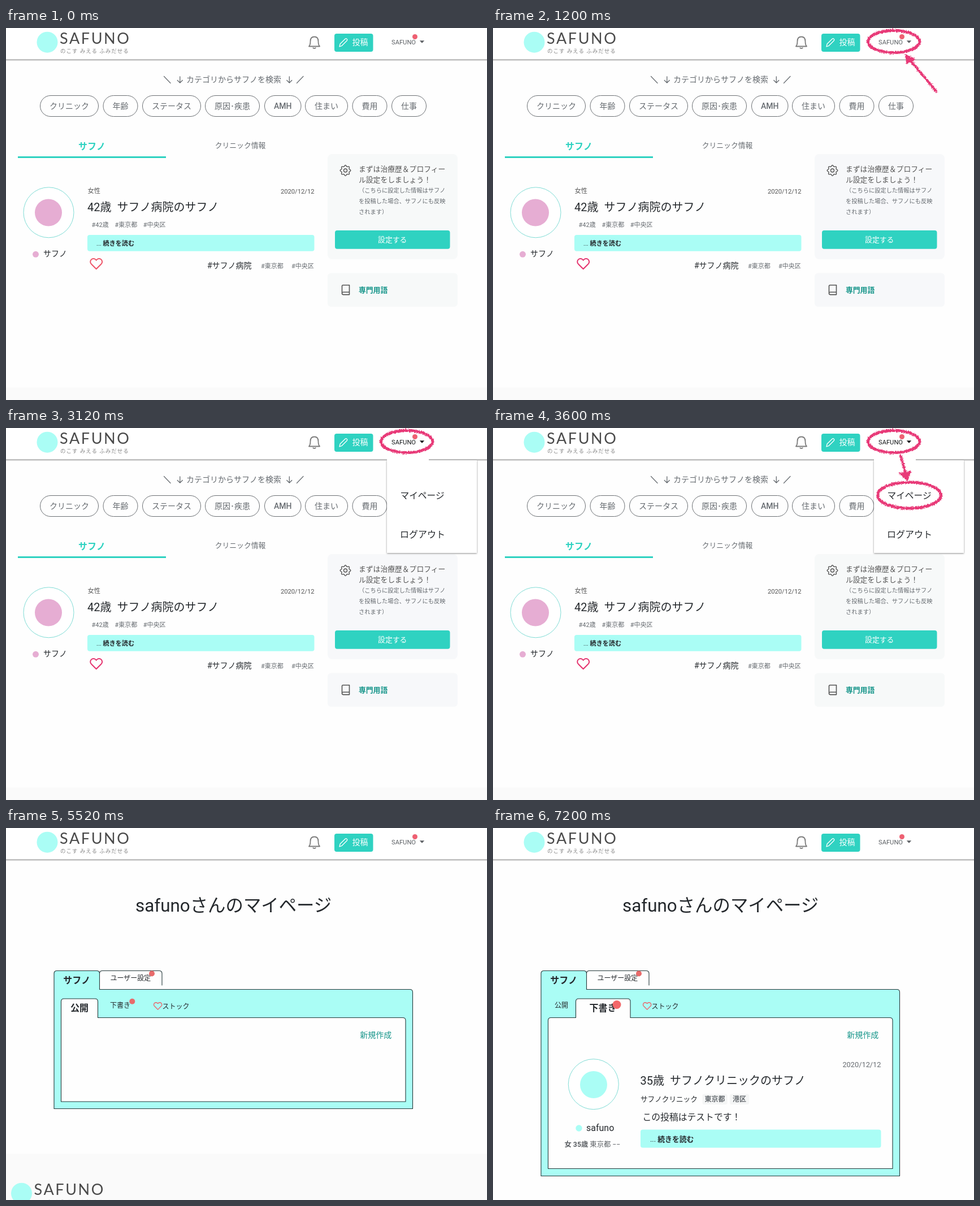
An HTML page that plays this animation: 851 px wide and 658 px high, repeating every 8000 ms.

```html
<!DOCTYPE html>
<html lang="ja">
<head>
<meta charset="utf-8">
<title>マイページの使い方</title>
<style>
html, body { margin: 0; width: 100%; height: 100%; overflow: hidden; background: #fefefe; }
svg { display: block; width: 851px; height: 658px; }
text { font-family: Roboto, "Noto Sans CJK JP", "Noto Sans CJK", sans-serif; white-space: pre; }
.logo { font-family: Lato, sans-serif; letter-spacing: 2.6px; }
.tagline { letter-spacing: 1px; }
.mark { fill: none; stroke: #e83a78; stroke-width: 5; stroke-linecap: round; filter: url(#crayon); }
.mark path { stroke-width: 4.4; }
.mark polygon { fill: #e83a78; stroke-width: 1.5; }
</style>
</head>
<body>
<svg id="stage" viewBox="0 0 851 658" xmlns="http://www.w3.org/2000/svg"></svg>
<script>
const TEAL = '#2fd2c1', AQUA = '#aafdf5', DEEP = '#16958a', INK = '#24282c',
      GREY = '#666b70', LINE = '#24383a', CORAL = '#ec646a', PINK = '#e6add3';
const STEP = 1200, LOOP = 8000;

// Drawing helpers, each returning SVG markup
const text = (x, y, size, str, { fill = INK, w = 400, a = 'start', cls = '' } = {}) =>
  `<text x="${x}" y="${y}" font-size="${size}" fill="${fill}" font-weight="${w}" text-anchor="${a}" class="${cls}">${str}</text>`;
const box = (x, y, w, h, fill, r = 0, stroke = 'none') =>
  `<rect x="${x}" y="${y}" width="${w}" height="${h}" rx="${r}" fill="${fill}" stroke="${stroke}"/>`;
const dot = (x, y, r, fill, stroke = 'none') =>
  `<circle cx="${x}" cy="${y}" r="${r}" fill="${fill}" stroke="${stroke}"/>`;
const path = (d, stroke, w = 1, fill = 'none') =>
  `<path d="${d}" stroke="${stroke}" stroke-width="${w}" fill="${fill}" stroke-linecap="round" stroke-linejoin="round"/>`;
const heart = (x, y, s, color) =>
  `<g transform="translate(${x} ${y}) scale(${s})">` +
  path('M20.84 4.61a5.5 5.5 0 0 0-7.78 0L12 5.67l-1.06-1.06a5.5 5.5 0 0 0-7.78 7.78l1.06 1.06L12 21.23l7.78-7.78 1.06-1.06a5.5 5.5 0 0 0 0-7.78z', color, 2) + '</g>';
const oval = (x, y, rx, ry) => `<ellipse cx="${x}" cy="${y}" rx="${rx}" ry="${ry}"/>`;
const arrow = (line, head) => `<path d="${line}"/><polygon points="${head}"/>`;
const mark = body => `<g class="mark">${body}</g>`;
const readMore = (x, y, size) =>
  text(x, y, size, '... <tspan font-weight="700">続きを読む</tspan>');
// Group shown only during the listed steps
const during = (steps, ...parts) => `<g data-steps="${steps}">${parts.join('')}</g>`;

// Eight rounded teeth: the radius swings with the angle
function gear(x, y) {
  const pts = Array.from({ length: 96 }, (_, i) => {
    const a = i * Math.PI / 48, r = 8.2 + 1.1 * Math.cos(8 * a);
    return `${(x + r * Math.cos(a)).toFixed(1)} ${(y + r * Math.sin(a)).toFixed(1)}`;
  });
  return path(`M${pts.join('L')}z`, '#555', 1.4) +
    `<circle cx="${x}" cy="${y}" r="3" fill="none" stroke="#555" stroke-width="1.4"/>`;
}

const logo = () =>
  dot(73, 25.2, 18.5, AQUA) +
  text(95, 28, 27, 'SAFUNO', { fill: '#4a4a4a', cls: 'logo' }) +
  text(96, 44, 9.5, 'のこす みえる ふみだせる', { fill: '#888', cls: 'tagline' });

const account = fill =>
  text(682, 28.5, 11.2, 'SAFUNO', { fill }) +
  `<path d="M731.8 22.3h8.4l-4.2 4.4z" fill="${fill}"/>` + dot(723.5, 15.5, 4.5, '#ee6072');

const header = () => [
  box(0, 0, 851, 55.5, '#fff'),
  box(0, 55.3, 851, 1.7, '#b2b2b2'), box(0, 57, 851, 1.2, '#e4e4e4'),
  logo(),
  path('M545.5 15.5c-5 0-7 3.8-7 8 0 5.5-1 7.5-2.5 9h19c-1.5-1.5-2.5-3.5-2.5-9 0-4.2-2-8-7-8zM543.3 35.3q2.2 1.6 4.4 0', '#7c7c7c', 1.8),
  box(581, 10, 68.5, 32, TEAL, 4),
  path('M590 33l1.2-5 9-8.8q1.5-1.2 2.9.2t.2 2.9l-9 9z', '#fff', 1.3),
  text(612.5, 30, 14, '投稿', { fill: '#fff', w: 500 })
].join('');

const pills = [
  [60.5, 103, 'クリニック'], [172, 61, '年齢'], [241.5, 103, 'ステータス'], [352.5, 96, '原因･疾患'],
  [457.5, 64.5, 'AMH'], [529.5, 75, '住まい'], [613, 61, '費用'], [682.5, 61, '仕事']
].map(([x, w, s]) =>
  box(x, 119.5, w, 37, 'none', 18.5, '#6c7074') +
  text(x + w / 2, 143, 14, s, { fill: GREY, w: 500, a: 'middle' })).join('');

const down = x => path(`M${x} 86v11M${x - 4.5} 92.5l4.5 4.5 4.5-4.5`, GREY, 1.3);

const tags = (y, list) => list.map(([x, s]) => text(x, y, 11, s, { fill: GREY })).join('');

const article = () => [
  text(152, 215, 16, 'サフノ', { fill: TEAL, w: 700, a: 'middle' }),
  box(21, 227, 262, 3, TEAL),
  text(414.5, 212.3, 12.8, 'クリニック情報', { fill: GREY, a: 'middle' }),
  dot(75.5, 326.3, 44.5, '#fff', '#7fdcd5'), dot(75, 326.5, 24, PINK),
  dot(52.5, 400.3, 5.5, PINK), text(66, 404.3, 14, 'サフノ'),
  text(144.5, 292.3, 11.2, '女性', { fill: '#555' }),
  text(545.5, 292.7, 11.2, '2020/12/12', { fill: '#555', a: 'end' }),
  text(144, 324, 20, '42歳\u00a0\u00a0サフノ病院のサフノ'),
  tags(352, [[151.5, '#42歳'], [192.5, '#東京都'], [242.8, '#中央区']]),
  box(144, 366, 401.5, 28.7, AQUA, 4),
  readMore(160, 384.5, 11.1),
  text(356, 425.3, 14, '#サフノ病院'),
  tags(425, [[451, '#東京都'], [505, '#中央区']])
].join('');

const cards = fill => box(569, 223, 230, 186, fill, 8) + box(569, 433.5, 230, 59.5, fill, 6);

const sidebar = () => {
  const note = ['（こちらに設定した情報はサフノ', 'を投稿した場合、サフノにも反映', 'されます）'];
  return [
    gear(600.5, 252),
    text(624, 254, 12.8, 'まずは治療歴＆プロフィー', { fill: '#555' }),
    text(624, 273, 12.8, 'ル設定をしましょう！', { fill: '#555' }),
    ...note.map((s, i) => text(624, 291.3 + 19 * i, 10.24, s, { fill: GREY })),
    box(582, 358, 203.5, 32.8, TEAL, 4),
    text(683.7, 379.2, 12.8, '設定する', { fill: '#fff', w: 500, a: 'middle' }),
    path('M596.5 454.8h11v16.8h-11q-2-.2-2-2v-12.8q0-2 2-2zM594.5 469q.2-1.8 2-1.8h11', '#555', 1.6),
    text(624, 468, 12.8, '専門用語', { fill: DEEP, w: 700 })
  ].join('');
};

const home = () => [
  path('M279.5 85.5l11.5 12M526 85.5l-11.5 12', GREY, 1.2), down(307.8), down(501.3),
  text(319, 96.3, 14, 'カテゴリからサフノを検索', { fill: GREY }),
  pills, article(), sidebar(), box(0, 636, 851, 22, '#fafafa')
].join('');

const menu = () => [
  `<rect x="674" y="57" width="159" height="164" fill="#fff" filter="url(#drop)"/>`,
  box(674, 54.5, 74, 5, '#fff'),
  text(697.5, 125.3, 15.7, 'マイページ'), text(697, 193.8, 16, 'ログアウト')
].join('');

// Panel whose top edge opens into a tab between x1 and x2
const panel = (l, r, top, bottom, x1, x2, tabTop, fill) => path(
  `M${l} ${bottom}` +
  (x1 > l ? `V${top + 5}q0-5 5-5H${x1}` : '') +
  `V${tabTop + 5}q0-5 5-5H${x2 - 5}q5 0 5 5V${top}H${r - 5}q5 0 5 5V${bottom}z`, LINE, 1.1, fill);

const outer = bottom => [
  panel(85, 719.5, 285.5, bottom, 85, 165.5, 252.5, AQUA),
  path('M165.5 257.5q0-5 5-5H271q5 0 5 5V278', LINE, 1.1),
  text(125.3, 274.5, 16, 'サフノ', { w: 700, a: 'middle' }),
  text(184.5, 269.7, 12, 'ユーザー設定'), dot(258, 257.5, 5, '#e86b6b')
].join('');

const heading = text(229, 148, 31.4, 'safunoさんのマイページ');
const create = text(626.3, 371, 14, '新規作成', { fill: DEEP });
const stock = x => heart(x, 306.7, 0.68, CORAL) + text(x + 16, 319.8, 12, 'ストック');

const published = () => [
  box(0, 576, 851, 82, '#fafafa'),
  `<g transform="translate(-45.5 621)">${logo()}</g>`,
  outer(496.5),
  panel(97.5, 707, 335.5, 484, 97.5, 162.5, 302, '#fefefe'),
  text(130, 324.3, 16, '公開', { w: 700, a: 'middle' }),
  text(184, 318.3, 12, '下書き'), dot(223.3, 306.7, 5, '#e86b6b'),
  stock(260.5), create
].join('');

const drafts = () => [
  outer(615.5),
  panel(97.5, 707, 335.5, 602.5, 146.5, 243, 302, '#fefefe'),
  text(109, 318.3, 12, '公開'),
  text(194.5, 324.3, 16, '下書き', { w: 700, a: 'middle' }), dot(219, 312.5, 7.5, '#f2686a'),
  stock(264.5), create,
  text(686.5, 422.7, 12.8, '2020/12/12', { fill: GREY, a: 'end' }),
  dot(177.8, 453.2, 44.5, '#fff', '#7fdcd5'), dot(178, 454, 24, AQUA),
  dot(152, 531, 5.7, AQUA), text(165, 536, 16, 'safuno'),
  text(126.5, 563.5, 12.3, '<tspan font-weight="700">女 35歳</tspan> 東京都 −−', { fill: '#5c6064' }),
  text(260.5, 454, 20, '35歳\u00a0\u00a0サフノクリニックのサフノ'),
  text(261, 484, 12.6, 'サフノクリニック'),
  box(370.5, 470.5, 44, 18.5, '#f5f6f6', 3), box(419, 470.5, 34, 18.5, '#f5f6f6', 3),
  text(392.6, 484.2, 12, '東京都', { fill: GREY, w: 700, a: 'middle' }),
  text(436, 484.2, 12, '港区', { fill: GREY, w: 700, a: 'middle' }),
  text(264.5, 517.3, 15.8, 'この投稿はテストです！'),
  box(261, 533.5, 425.5, 32, AQUA, 4),
  readMore(278, 554.5, 12.8)
].join('');

const defs = `<defs>
  <filter id="crayon" filterUnits="userSpaceOnUse" x="0" y="0" width="851" height="658" color-interpolation-filters="sRGB">
    <feTurbulence type="fractalNoise" baseFrequency="0.45" numOctaves="2" seed="4"/>
    <feDisplacementMap in="SourceGraphic" scale="5" xChannelSelector="R" yChannelSelector="G"/>
  </filter>
  <filter id="drop" x="-10%" y="-10%" width="120%" height="120%">
    <feDropShadow dx="0" dy="1" stdDeviation="1.5" flood-color="#000" flood-opacity="0.45"/>
  </filter>
</defs>`;

const stage = document.getElementById('stage');
stage.innerHTML = [
  defs, box(0, 0, 851, 658, '#fefefe'), header(),
  during('03', cards('#f7f9f9')), during('12', cards('#f7f8fa')),
  during('0123', home()),
  during('0', heart(147.7, 405, 1, '#ee5468')), during('123', heart(147.7, 405, 1, '#e5336e')),
  during('23', menu()),
  during('01456', account('#5c6064')), during('23', account('#16181a')),
  during('456', heading), during('45', published()), during('6', drafts()),
  during('123', mark(oval(709, 24, 45.5, 19.5))),
  during('1', mark(arrow('M784 112L739 58', '730,47 747,55 732,63'))),
  during('3', mark(oval(736.5, 119, 56, 23) + arrow('M721 49L730 79', '719,80 739,77 733,93'))),
  during('5', mark(oval(204.8, 312.5, 34, 23.5) + arrow('M319 458L236 358', '220,341 245,349 223,366')))
].join('');

const layers = [...stage.querySelectorAll('[data-steps]')];
let shown = -1;
function tick() {
  const step = Math.floor(performance.now() % LOOP / STEP);
  if (step !== shown) {
    shown = step;
    for (const g of layers) g.style.display = g.dataset.steps.includes(step) ? '' : 'none';
  }
  requestAnimationFrame(tick);
}
tick();
</script>
</body>
</html>
```
